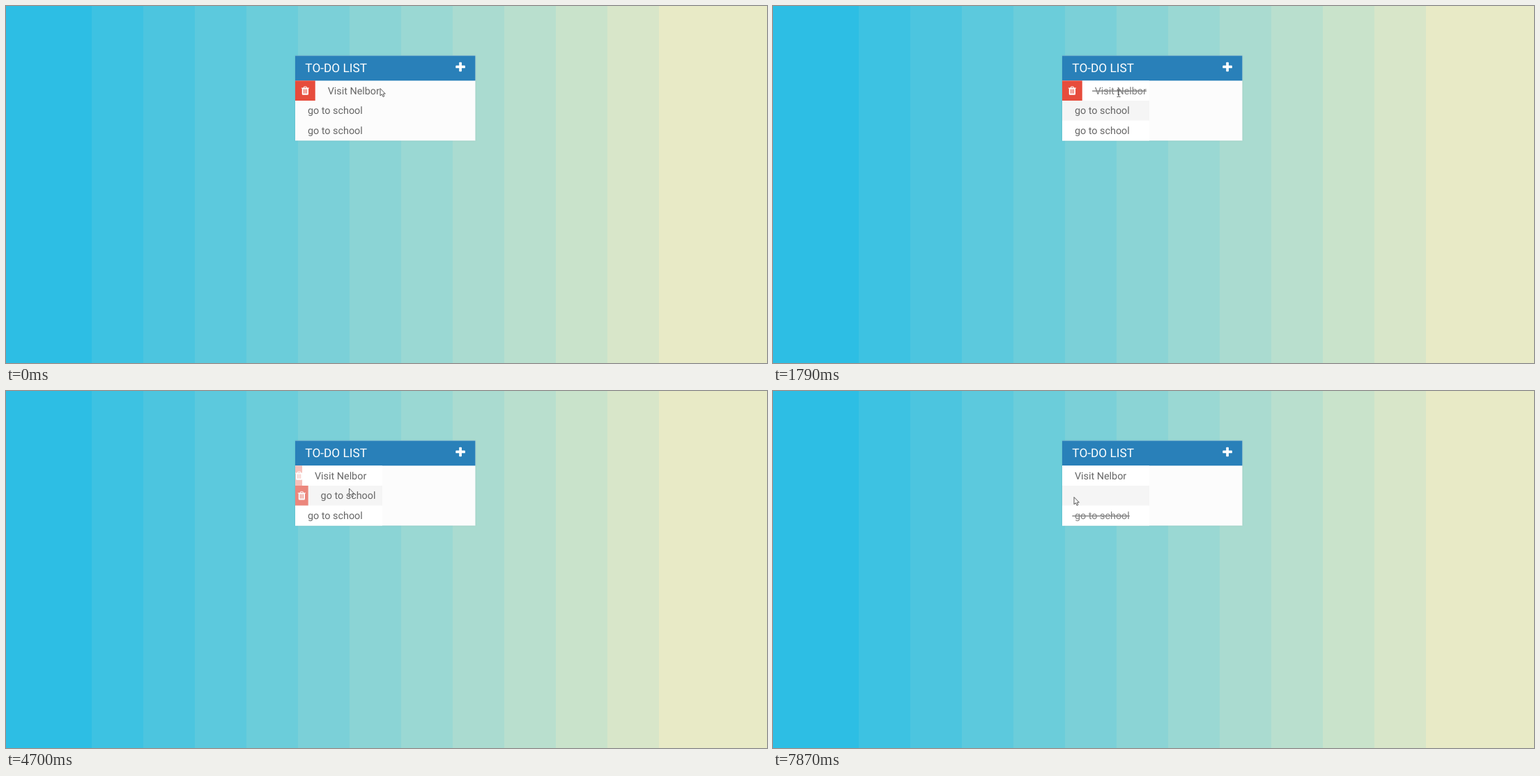
An HTML page for the animation above (8 s loop, 1092 px wide and 513 px high).

```html
<!DOCTYPE html>
<html lang="en">
<head>
<meta charset="utf-8">
<title>To-do list</title>
<style>
  html, body { margin: 0; width: 100%; height: 100%; overflow: hidden; }
  svg { display: block; width: 1092px; height: 513px; }
  text { font-family: Roboto, sans-serif; white-space: pre; text-rendering: geometricPrecision; }
  .item { font-size: 20px; fill: #666; }
  .done { fill: #808080; text-decoration: line-through; }
  #panel { filter: drop-shadow(0 0 1.5px rgba(0, 0, 0, .1)); }
</style>
</head>
<body>
<svg viewBox="0 0 1092 513">
  <g id="bands" shape-rendering="crispEdges"></g>
  <g id="list">
    <rect id="panel" width="360" height="170" fill="#fcfcfc"/>
    <rect width="360" height="50" fill="#2980b9"/>
    <text x="20" y="33.5" font-size="24" fill="#fff">TO-DO LIST</text>
    <g transform="translate(330.2 22.4)" fill="#fff">
      <rect x="-9.5" y="-2.6" width="19" height="5.2" rx="1.3"/>
      <rect x="-2.6" y="-9.5" width="5.2" height="19" rx="1.3"/>
    </g>
    <g id="rows"></g>
  </g>
  <g id="cursor">
    <path id="arrow" d="M0 0V10.4L2.4 8.2L4.1 12L5.8 11.2L4.2 7.6H7.3Z" fill="#fff" stroke="#444" stroke-width=".9"/>
    <path id="beam" d="M-2.5 -5H-.7L0 -4.3L.7 -5H2.5M-2.5 5H-.7L0 4.3L.7 5H2.5M0 -4.3V4.3M-1.2 2H1.2" fill="none" stroke="#444" stroke-width=".9"/>
  </g>
</svg>
<script>
// The list is laid out in its own units and scaled onto the stage
const LOOP = 8000, LEFT = 415, TOP = 71.4, SCALE = .718;
const HEAD = 50, ROW = 40, SLIDE = 200, LAG = 30, STEP = 10;
const $ = id => document.getElementById(id);
const clamp = v => Math.max(0, Math.min(1, v));
const mix = (a, b, k) => a + (b - a) * k;
const show = (el, on) => el.setAttribute("visibility", on ? "visible" : "hidden");

function add(parent, tag, attrs) {
  const el = document.createElementNS("http://www.w3.org/2000/svg", tag);
  for (const k in attrs) el.setAttribute(k, attrs[k]);
  return parent.appendChild(el);
}

// Background: a gradient in 13 flat bands
const from = [45, 190, 228], to = [232, 234, 198];
for (let k = 0; k <= 12; k++) {
  const x = k ? 49 + 74 * k : 0;
  const rgb = from.map((c, i) => Math.round(mix(c, to[i], k / 12)));
  add($("bands"), "rect", { x, width: 1092 - x, height: 513, fill: `rgb(${rgb})` });
}

$("list").setAttribute("transform", `translate(${LEFT} ${TOP}) scale(${SCALE})`);

const BIN = "M0 2.2Q0 2 .2 2H2.7L3.3 .7Q3.6 0 4.4 0H6.6Q7.4 0 7.7 .7L8.3 2H10.8Q11 2 11 2.2V2.8Q11 3 10.8 3H10" +
  "V10.5Q10 12 8.8 12H2.2Q1 12 1 10.5V3H.2Q0 3 0 2.8ZM3.75 2H7.25L6.9 1.1Q6.8 1 6.7 1H4.3Q4.2 1 4.1 1.1Z" +
  [3, 5, 7].map(x => `M${x} 4V10H${x + 1}V4Z`).join("");

const rows = [
  { label: "Visit Nelbor", done: [1790, 4300] },
  { label: "go to school", done: [5190, LOOP] },
  { label: "go to school", done: [6380, LOOP] }
];

rows.forEach((row, i) => {
  const y = HEAD + ROW * i;
  row.mid = y + ROW / 2;
  row.shade = add($("rows"), "rect", { y, width: 174, height: ROW, fill: i % 2 ? "#f5f5f5" : "#fff" });
  row.body = add($("rows"), "g", {});
  row.bin = add(row.body, "g", {});
  row.red = add(row.bin, "rect", { y, height: ROW, fill: "#e74c3c" });
  row.icon = add(row.bin, "path", { d: BIN, fill: "#fff", "fill-rule": "evenodd" });
  row.text = add(row.body, "text", { y: y + 27, class: "item" });
  row.text.textContent = " " + row.label;
});

// Pointer stops on the stage: time, x, y
const stops = [
  [130, 537, 118.5], [490, 513, 197], [920, 495.5, 138], [1300, 496, 125.5],
  [2450, 496, 125.5], [3020, 495, 181], [3200, 495, 181], [3230, 494.5, 155],
  [3780, 493, 124], [4210, 493, 124], [4700, 492.5, 140], [5190, 490, 152],
  [5640, 490, 152], [5830, 489.5, 178.5], [6380, 488, 180], [6920, 432, 152.5]
];

function pointer(t) {
  const i = stops.findIndex(s => s[0] > t);
  if (i < 1) return stops.at(i).slice(1);
  const [a, ax, ay] = stops[i - 1], [b, bx, by] = stops[i];
  const u = (t - a) / (b - a), k = u * u * (3 - 2 * u);
  return [mix(ax, bx, k), mix(ay, by, k)];
}

// Each row's bin slides out while the pointer is on the row
rows.forEach((row, i) => {
  let p = i ? 0 : 1;
  row.slide = [p];
  for (let t = STEP; t <= LOOP; t += STEP) {
    const y = (pointer(t - LAG)[1] - TOP) / SCALE;
    const over = Math.abs(y - row.mid) < ROW / 2;
    p = clamp(p + (over ? STEP : -STEP) / SLIDE);
    row.slide.push(p);
  }
  row.wakes = STEP * row.slide.findIndex(v => v !== row.slide[0]);
});

function draw(t) {
  const [x, y] = pointer(t);
  const px = (x - LEFT) / SCALE, py = (y - TOP) / SCALE;
  let overText = false;

  rows.forEach(row => {
    const p = row.slide[Math.floor(t / STEP)], w = ROW * p, tx = 20 + w;
    show(row.shade, t >= row.wakes);
    row.bin.setAttribute("opacity", p);
    row.red.setAttribute("width", w);
    row.icon.setAttribute("transform",
      `translate(${Math.max(0, (w - 15.7) / 2)} ${row.mid - 8.6}) scale(1.43)`);
    row.text.setAttribute("x", tx);
    row.text.classList.toggle("done", t >= row.done[0] && t < row.done[1]);
    const end = tx + row.text.getComputedTextLength();
    if (Math.abs(py - row.mid) < 12 && px > tx && px < end) overText = true;
  });

  const fade = clamp((t - 7370) / 500);
  rows[1].body.setAttribute("opacity", .5 + Math.cos(Math.PI * fade) / 2);

  $("cursor").setAttribute("transform", `translate(${x} ${y})`);
  show($("arrow"), !overText);
  show($("beam"), overText);
}

function loop() {
  draw(performance.now() % LOOP);
  requestAnimationFrame(loop);
}
loop();
</script>
</body>
</html>
```
